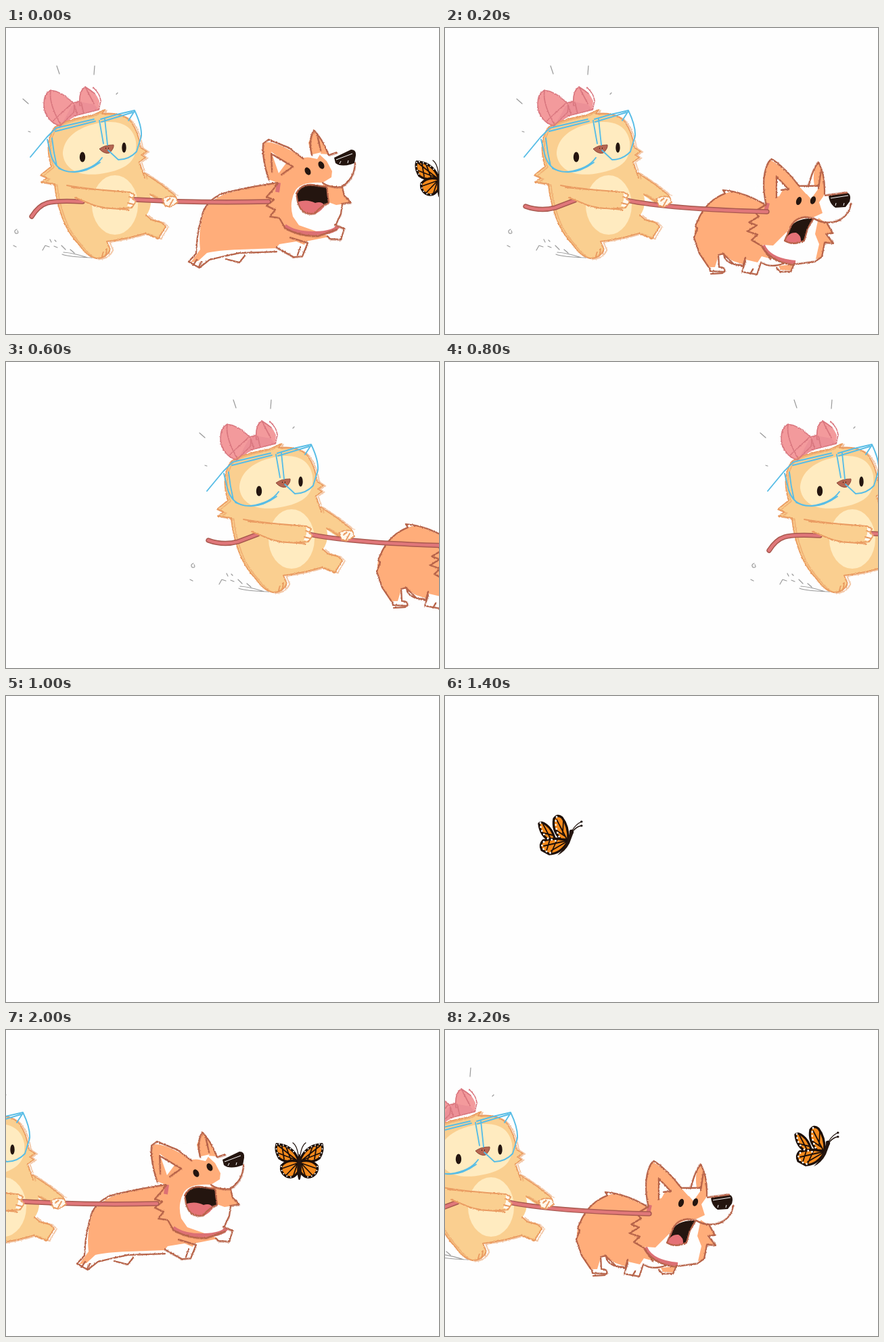
Recreate the animation shown at these times as an HTML page. Size 640x453 px, loop 2400 ms.

```html
<!DOCTYPE html>
<html lang="en">
<head>
<meta charset="utf-8">
<title>Butterfly chase</title>
<style>
  html, body { margin: 0; width: 100%; height: 100%; overflow: hidden; background: #fefefe; }
  svg { display: block; width: 100%; height: 100%; }
  .line, .rope, .glasses, .marks { fill: none; stroke-linecap: round; stroke-linejoin: round; }
  .line { stroke-width: 1.9; }
  .girl { stroke: #ea9c62; }
  .dog { stroke: #b7644a; stroke-width: 2.1; }
  .bow { stroke: #d9777f; stroke-width: 1.7; }
  .glasses { stroke: #58bde6; stroke-width: 1.9; }
  .marks { stroke: #999; stroke-width: 1.2; }
  .tan { fill: #facf90; }
  .cream { fill: #ffebc0; }
  .fur { fill: #ffad7a; }
  .white { fill: #fefefe; }
  .dark { fill: #24150f; }
  .tongue { fill: #e47176; }
  .edge { stroke: #a9594f; stroke-width: 7.4; }
  .core { stroke: #e0777a; stroke-width: 4.4; }
  .collar { fill: none; stroke: #dc7074; stroke-width: 6; }
  .wing { fill: #f58a1c; stroke: #1d0f09; stroke-width: 3.4; stroke-linejoin: round; }
  .vein { fill: none; stroke: #1d0f09; stroke-width: 1.8; stroke-linecap: round; }
  .dots { fill: none; stroke: #fff; stroke-width: 2.8; stroke-linecap: round; stroke-dasharray: 0 6; }
</style>
</head>
<body>
<svg viewBox="0 0 640 453" preserveAspectRatio="none">
  <defs>
    <filter id="pencil" color-interpolation-filters="sRGB">
      <feTurbulence type="fractalNoise" baseFrequency=".4" numOctaves="2" seed="4"/>
      <feDisplacementMap in="SourceGraphic" scale="2.6" xChannelSelector="R" yChannelSelector="G"/>
    </filter>
    <path id="ropeRun" d="M38 279Q48 263 61 259T113 257M190 254L235 256Q310 259 388 257"/>
    <path id="ropeCrouch" d="M38 264Q60 272 82 266L111 255M187 255Q250 268 395 272"/>
  </defs>

  <g id="pair">
    <!-- dog, leaping -->
    <g class="runOnly">
      <path class="white" d="M284 320L281 336 270 346 286 355 301 344 325 341 345 347 353 337 400 332 425 339 438 338 446 318 475 312 495 313 500 297 490 290 494 262 509 257 497 236Q515 226 516 198L512 181 477 188 455 151 448 168 390 166 382 172Z"/>
      <path class="fur" d="M287 328Q284 300 291 275 297 257 325 245 365 234 401 229L388 224Q377 190 382 170 396 165 439 192L452 191 447 170 455 150 469 169 477 187 462 186 474 197 482 212 481 221 468 229Q437 227 428 240 418 258 424 279L433 292 470 305 478 309 443 316 441 321 429 316 404 320 399 326 345 328Q313 329 297 333L284 345 273 347Z"/>
      <path class="fur" d="M468 231L498 236 501 249 510 258 495 261 488 262 477 258Z"/>
      <path class="white" d="M392 183L414 200 403 215Z M441 190L466 184 460 194Z"/>
      <path class="dark" d="M429 245Q436 230 454 232L474 235 477 259Q466 262 457 272 437 274 431 257Z"/>
      <path class="tongue" d="M432 257Q446 253 457 259 467 256 471 263 463 276 449 276 434 272 432 257Z"/>
      <path class="dark" d="M485 192L510 180Q518 180 517 189L515 200Q496 207 487 200Z"/>
      <ellipse class="dark" cx="446" cy="212" rx="4" ry="6" transform="rotate(-28 446 212)"/>
      <ellipse class="dark" cx="466" cy="203" rx="4" ry="6" transform="rotate(-28 466 203)"/>
      <path d="M488 195L512 186M493 201L495 197M505 200L506 196" stroke="#fefefe"/>
      <path class="collar" d="M403 229L401 243M412 293Q428 305 457 304T491 293"/>
      <g filter="url(#pencil)">
        <g id="leapLines" class="line dog">
          <path d="M401 229Q353 236 320 245 294 256 289 280 282 305 281 334L270 346 286 355 301 343 322 338 345 333 400 331M325 342L345 347 353 337M400 325L425 339 438 338 446 318 420 310M475 308L479 312 495 313 500 297 486 291M277 351L282 343M285 354L289 346M431 336L435 324"/>
          <path d="M389 226Q378 195 380 171L388 165 418 177 439 193M452 188Q446 166 455 151 467 163 477 188L489 184M393 213L392 186 424 205 407 217M460 159L465 181M402 229L394 240 385 250 396 254 385 263 398 269 390 279 404 281 412 295M516 200Q515 223 496 235 479 237 468 229M497 236L500 248 510 258 497 260 495 275 487 292M429 245Q436 230 454 232L474 235 477 259Q466 262 457 274 437 279 431 257ZM412 296Q435 309 461 308L489 298"/>
        </g>
        <use href="#leapLines" transform="translate(2 -2) rotate(.4)" opacity=".5"/>
      </g>
    </g>

    <!-- dog, landing -->
    <g class="crouchOnly" transform="translate(-81)">
      <path class="white" d="M375 330L392 361 412 362 414 338 430 348 444 343 445 364 465 365 468 349 490 352 491 361 514 361 517 349 551 343 567 317 560 294 585 286 598 273 596 252 563 247 552 200 540 233 521 234 483 195 470 225Z"/>
      <path class="fur" d="M369 310Q367 285 386 264 403 243 430 242L475 262Q467 217 480 195 501 205 524 235L534 246 546 234Q542 210 552 199 563 217 560 248L553 258 558 274 545 280Q517 280 507 300L485 322 470 321 483 342 468 338 462 347 445 343 441 350 426 345 413 337 405 334 399 354 388 354 378 338Z"/>
      <path class="fur" d="M552 281L566 291 573 304 562 306 574 318 561 318 556 341 548 342 553 320 547 305Z"/>
      <path class="fur" d="M493 352L514 350 511 359 496 358Z"/>
      <path class="white" d="M489 250L490 220 507 238 499 240 494 249Z M526 236L554 235 541 253Z"/>
      <path class="dark" d="M545 282Q515 281 509 299L502 315Q514 323 531 315L536 297Z"/>
      <path class="tongue" d="M502 316Q507 302 519 303 527 307 526 317 513 322 502 316Z"/>
      <path class="dark" d="M567 248L595 244Q601 247 598 257L592 265 577 266Q568 260 567 248Z"/>
      <path d="M570 252L596 248M577 263L578 259M589 263L590 259" stroke="#fefefe"/>
      <ellipse class="dark" cx="523" cy="256" rx="3.8" ry="6.3" transform="rotate(18 523 256)"/>
      <ellipse class="dark" cx="544" cy="255" rx="3.8" ry="6" transform="rotate(18 544 255)"/>
      <path class="collar" d="M477 259L474 272M470 322Q479 344 518 347"/>
      <g filter="url(#pencil)">
        <g id="landLines" class="line dog">
          <path d="M474 262Q447 246 425 242L411 240 414 245Q389 255 377 278L370 293 373 297 368 310 376 334 391 356 392 360 413 361Q415 354 405 354L404 336 412 334Q412 344 424 349L440 353 444 340M444 345L439 361 461 365 467 347Q480 356 500 349M490 355L495 361 511 361 516 349M393 364L411 363M412 335L427 350 438 351M451 364L455 357"/>
          <path d="M475 263Q466 223 478 199L483 194Q503 207 524 235M537 235Q544 208 552 199 562 216 561 246M490 251L490 220 508 239 497 240M556 211L552 238M525 234L551 234M474 262L457 272 464 279 449 288 461 292 447 301 462 306 453 314 467 322 481 342M600 260Q598 278 580 286 561 292 545 282L532 280Q514 282 509 299L502 315Q514 323 531 315L536 297 545 282M565 290L573 304 563 305 574 319 561 318 557 339 547 346 517 350M562 248L594 244M470 325Q482 347 516 351"/>
        </g>
        <use href="#landLines" transform="translate(-1.5 2) rotate(-.3)" opacity=".5"/>
      </g>
    </g>

    <!-- girl -->
    <g class="marks">
      <path d="M75 56L79 68M131 56L130 69M25 105L33 112M33 153L36 154M163 98L165 96"/>
      <path d="M16 298Q11 300 14 304 20 305 17 300M11 322L15 324M54 329L58 322 64 324M65 313L67 317M72 314L74 316M71 323L76 325M82 322L88 328M95 328L101 333M83 335Q92 339 128 340M85 332Q100 333 121 340"/>
    </g>
    <path class="tan" d="M72 147C84 138 108 133 128 129L146 121 142 127Q172 124 185 139 196 155 199 177L208 183 201 190 206 193 197 199 203 215 230 232 250 248 247 260 233 262 213 248Q217 264 207 278L215 284 230 288 236 294 225 312 206 304Q180 312 149 316L154 328Q146 341 134 341 120 340 108 322 88 302 79 270 72 245 71 231L52 229 61 222 51 218 67 205Q56 168 72 147Z"/>
    <path class="cream" d="M84 187C84 168 98 149 135 141 170 134 188 146 192 168 195 195 180 208 150 214 110 223 87 210 84 187Z"/>
    <ellipse class="cream" cx="161" cy="262" rx="34" ry="44"/>
    <path d="M57 122Q53 99 66 92 82 94 99 111L109 107Q108 91 117 87 132 93 138 108L137 121 103 130 80 145Q63 140 57 122Z" fill="#f39a9c"/>
    <path d="M97 116L107 109 130 113 137 121 103 130 82 143Z" fill="#ec9097"/>
    <g filter="url(#pencil)">
      <g id="girlLines" class="line girl">
        <path d="M72 147C84 138 108 133 128 129L146 121 142 127Q172 124 185 139 196 155 199 177L208 183 200 188 206 192 197 198 205 222M72 147Q56 168 67 205L51 218 61 222 52 228 72 231Q74 255 83 280 91 303 109 322 122 340 134 341 148 341 154 328L149 316Q180 312 206 304L225 312 236 294 230 288 215 284 207 277M203 214L230 232 250 248M213 246L232 258M142 338L144 331M148 334L149 327"/>
      </g>
      <use href="#girlLines" transform="translate(2 2) rotate(-.4)" opacity=".55"/>
      <g class="line bow">
        <path d="M57 122Q53 99 66 92 82 94 97 109 103 113 100 125L80 145Q63 140 57 122ZM66 93Q63 112 81 143M70 137L97 112M99 111L107 109M109 115Q107 94 117 87L131 97M129 88Q140 99 140 108L137 121 101 130M111 110L115 127M118 89L130 112M101 114L105 127"/>
      </g>
    </g>
    <ellipse class="dark" cx="113" cy="191" rx="4.2" ry="7.6"/>
    <ellipse class="dark" cx="174.500" cy="177" rx="3.200" ry="7.6"/>
    <path d="M138 179Q146 173 159 173 160 178 153 185 145 187 138 179Z" fill="#b66551" stroke="#8d4a39"/>
    <path d="M147 178L148 178M151 178L152 178M150 181L151 181" stroke="#24150f" stroke-width="1.6"/>
    <g class="glasses">
      <path d="M36 191L60 162 74 148 130 135M73 153L132 138M61 165L66 186Q73 214 100 213 130 209 142 192M68 163Q70 183 75 204M78 208Q108 222 139 199M138 137L144 171M146 135L150 173M140 135L164 128 190 122M141 139L187 125M190 122Q201 145 200 160L193 183Q182 195 166 195L151 181M181 137L190 123"/>
    </g>

    <g class="rope runOnly"><use href="#ropeRun" class="edge"/><use href="#ropeRun" class="core"/></g>
    <g class="rope crouchOnly"><use href="#ropeCrouch" class="edge"/><use href="#ropeCrouch" class="core"/></g>

    <path class="tan" d="M90 233Q123 238 183 243L190 254 185 267Q145 270 114 257L86 239Z"/>
    <path d="M183 243L189 246 187 252 192 256 187 265 179 264 183 255ZM232 251L240 249 251 250 254 258 243 265 235 263Z" fill="#fff8ec"/>
    <g class="line girl" filter="url(#pencil)">
      <path d="M90 233Q123 239 183 243L190 247 187 253 192 257 186 266Q152 270 129 262L102 251M97 236L130 239M140 266L182 269M182 250L188 252M180 259L188 261M231 253L240 249 251 250 254 258 243 265 235 263ZM238 256L243 252M242 263L247 254"/>
    </g>
  </g>

  <!-- butterfly, wings raised -->
  <g id="flyRaised">
    <path class="wing" d="M2 14Q5 10 13 16T25 35L20 40Q4 33 2 14Z"/>
    <path class="wing" d="M45 38Q25 34 8 39 2 45 6 53L17 59Q34 59 45 40Z"/>
    <path class="wing" d="M24 7Q29 -1 36 5 46 18 45 38L34 37Q21 24 24 7Z"/>
    <path class="vein" d="M8 15L20 38M5 27L22 31M28 8L43 37M25 22L41 33M38 10L37 28M44 40L20 54M44 39L9 47M29 37L20 57M18 38L13 54"/>
    <path class="dots" d="M4 13Q4 26 13 34M28 4Q24 17 32 34M9 41L6 47 10 54 20 58M15 36L32 41"/>
    <path class="dark" d="M48 25L53 27 47 43Q41 55 29 61L39 50 44 38Z"/>
    <circle class="dark" cx="50" cy="26" r="3.200"/>
    <path class="vein" style="stroke-width:1.3" d="M51 24Q57 14 65 11M53 24Q58 18 65 17"/>
    <path class="vein" d="M64.500 11L65 11M64.500 17L65 17" style="stroke-width:3"/>
  </g>

  <!-- butterfly, wings spread -->
  <g id="flySpread">
    <g id="spreadHalf">
      <path class="wing" d="M37 29Q28 5 4 4 1 14 8 25 17 32 37 29Z"/>
      <path class="wing" d="M37 30Q20 25 11 36 9 45 17 51 28 57 36 45Z"/>
      <path class="vein" d="M5 5L34 28M6 17L34 28M18 8L25 27M12 7L15 26M35 32L12 40M35 32L18 50M35 32L28 53"/>
      <path class="dots" d="M4 5Q2 15 9 25M8 4Q21 6 30 16M11 37L12 46 20 52 30 53" style="stroke-width:2"/>
      <path class="vein" d="M36 20Q34 6 28 2" style="stroke-width:1.3"/>
    </g>
    <use href="#spreadHalf" transform="matrix(-1 0 0 1 75 0)"/>
    <ellipse class="dark" cx="37.500" cy="38" rx="3.200" ry="19"/>
  </g>
</svg>
<script>
  const STEP = 200;
  // Each pose: horizontal place of girl and dog, then the butterfly's corner.
  const poses = [
    { pair: 0, fly: [603, 194] },
    { pair: 81 },
    { pair: 207 },
    { pair: 261 },
    { pair: 441 },
    {},
    { fly: [39, 237] },
    { fly: [137, 175] },
    { pair: -330, fly: [216, 190] },
    { pair: -237, fly: [315, 178] },
    { pair: -165, fly: [396, 165] },
    { pair: -93, fly: [516, 141] }
  ];
  const byId = id => document.getElementById(id);
  const runParts = document.querySelectorAll('.runOnly');
  const crouchParts = document.querySelectorAll('.crouchOnly');
  const pair = byId('pair'), raised = byId('flyRaised'), spread = byId('flySpread');
  const show = (node, on) => { node.style.display = on ? '' : 'none'; };
  const place = (node, x, y) => node.setAttribute('transform', `translate(${x} ${y})`);
  let shown = -1;

  function draw(time) {
    const index = Math.floor(time / STEP) % poses.length;
    if (index === shown) return;
    shown = index;
    const pose = poses[index], even = index % 2 === 0;
    show(pair, pose.pair !== undefined);
    if (pose.pair !== undefined) place(pair, pose.pair, 0);
    runParts.forEach(part => show(part, even));
    crouchParts.forEach(part => show(part, !even));
    show(spread, pose.fly && even);
    show(raised, pose.fly && !even);
    if (pose.fly) place(even ? spread : raised, ...pose.fly);
  }

  const start = performance.now();
  function tick() {
    draw(performance.now() - start);
    requestAnimationFrame(tick);
  }
  draw(0);
  requestAnimationFrame(tick);
</script>
</body>
</html>
```
